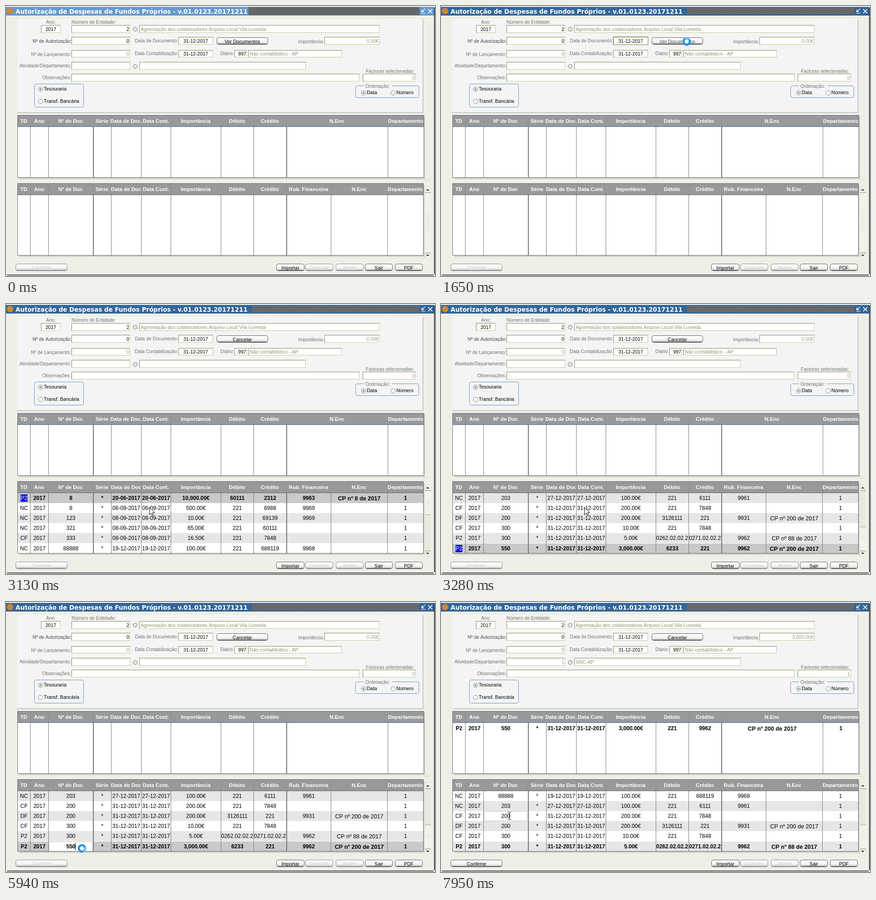
These frames come from a looping animation (943 px wide and 594 px high, 8 s). An HTML page with a canvas:

```html
<!DOCTYPE html>
<html lang="pt">
<head>
<meta charset="utf-8">
<title>Autorização de Despesas</title>
<style>
html, body { margin: 0; width: 100%; height: 100%; overflow: hidden; background: #fff; }
canvas { display: block; }
</style>
</head>
<body>
<canvas id="stage" width="943" height="594"></canvas>
<script>
const ctx = document.getElementById('stage').getContext('2d');
const LOOP = 8000;
const SANS = '"Liberation Sans", Arial, sans-serif';
const ROW_TOP = 416, ROW_H = 22.1, VISIBLE_ROWS = 6;

// TD | doc | dates | amount | debit | credit | budget line | order
const RECORDS = `P2|322|17-10-2013|100.00|228|221|13161|CP nº 322 de 2013
NC|569|02-02-2017,03-05-2017|15.00|0251.07.01.01|024.07.01.01.1|9962
NC|603|02-02-2017,03-05-2017|15.00|0251.07.01.01|024.07.01.01.1|9962
P2|8|20-06-2017|10,000.00|60111|2312|9963|CP nº 8 de 2017
NC|8|06-09-2017|500.00|221|6988|9969
NC|123|08-09-2017|10.00|221|69139|9969
NC|321|08-09-2017|65.00|221|60111
CF|333|08-09-2017|16.50|221|7848
NC|88888|19-12-2017|100.00|221|688119|9968
NC|203|27-12-2017|100.00|221|6111|9961
CF|200|31-12-2017|200.00|221|7848
DF|200|31-12-2017|200.00|3126111|221|9931|CP nº 200 de 2017
CF|300|31-12-2017|10.00|221|7848
P2|300|31-12-2017|5.00|0262.02.02.2.1|0271.02.02.2.1|9962|CP nº 88 de 2017
P2|550|31-12-2017|3,000.00|6233|221|9962|CP nº 200 de 2017`.split('\n').map(line => {
  const [td, doc, dates, amount, debit, credit, budget = '', order = ''] = line.split('|');
  const [docDate, postDate = docDate] = dates.split(',');
  return [td, docDate.slice(6), doc, '*', docDate, postDate, amount + '€', debit, credit, budget, order, '1'];
});
const CHOSEN = ['P2', '2017', '550', '*', '31-12-2017', '31-12-2017', '3,000.00€', '221', '9962', 'CP nº 200 de 2017', '1'];

const SHARED_EDGES = [25, 53, 93, 191, 231, 297, 362, 472, 544, 616];
const TOP = { y: 240, bottom: 377, edges: [...SHARED_EDGES, 839, 918],
  heads: 'TD,Ano,Nº de Doc,Série,Data de Doc.,Data Cont.,Importância,Débito,Crédito,N.Enc,Departamento'.split(',') };
const LIST = { y: 390, bottom: 548, edges: [...SHARED_EDGES, 714, 838, 917],
  heads: 'TD,Ano,Nº de Doc,Série,Data de Doc,Data Cont.,Importância,Débito,Crédito,Rub. Financeira,N.Enc,Departamento'.split(',') };

// Pointer travel: start, end, number of steps, destination
const MOVES = [
  [90, 880, 11, 541, 69], [960, 1110, 3, 540, 78],
  [1970, 2440, 7, 333, 393], [2520, 2670, 3, 316, 443], [3050, 3050, 1, 315, 447],
  [4380, 4840, 7, 171, 542], [5160, 5310, 3, 169, 542], [7250, 7950, 10, 150, 470]
];

function rect(x, y, w, h, color) {
  ctx.fillStyle = color;
  ctx.fillRect(x, y, w, h);
}

function text(s, x, yc, { size = 10.6, align = 'left', color = '#000', bold = false, font = SANS } = {}) {
  ctx.font = `${bold ? 'bold ' : ''}${size}px ${font}`;
  ctx.textAlign = align;
  ctx.fillStyle = color;
  ctx.fillText(s, x, Math.round(yc + size * 0.36));
}

function label(s, x, yc, align = 'right', color = '#707070') {
  text(s, x, yc, { size: 10.3, align, color });
}

function frame(x, y, w, h, radius, stroke, fill) {
  ctx.beginPath();
  ctx.roundRect(x + .5, y + .5, w - 1, h - 1, radius);
  if (fill) { ctx.fillStyle = fill; ctx.fill(); }
  ctx.strokeStyle = stroke;
  ctx.lineWidth = 1;
  ctx.stroke();
}

function disc(x, y, r, fill, stroke) {
  ctx.beginPath();
  ctx.arc(x, y, r, 0, Math.PI * 2);
  ctx.fillStyle = fill;
  ctx.fill();
  if (stroke) { ctx.strokeStyle = stroke; ctx.lineWidth = 1; ctx.stroke(); }
}

function shape(points, fill, stroke) {
  ctx.beginPath();
  points.forEach(([x, y]) => ctx.lineTo(x, y));
  ctx.closePath();
  ctx.fillStyle = fill;
  ctx.fill();
  if (stroke) { ctx.strokeStyle = stroke; ctx.lineWidth = 1; ctx.stroke(); }
}

function line(color, width, ...points) {
  ctx.beginPath();
  points.forEach(([x, y]) => ctx.lineTo(x, y));
  ctx.strokeStyle = color;
  ctx.lineWidth = width;
  ctx.stroke();
}

function field(x, y, right, bottom, value = '', align = 'right', color = '#000', pointer) {
  const w = right - x, h = bottom - y;
  rect(x, y, w, h, '#c6c69c');
  rect(x, y, w, 1, '#85855c');
  rect(x, y, 1, h, '#85855c');
  rect(x + 1, y + 1, w - 2, h - 2, '#fff');
  const tx = { left: x + 3, right: right - 2, center: x + w / 2 }[align];
  text(value, tx, (y + bottom) / 2 + .5, { align, color });
  if (pointer && pointer.x >= x && pointer.x < right && pointer.y >= y && pointer.y < bottom)
    frame(x - 1, y - 1, w + 2, h + 2, 0, '#a8a898');
}

function button(s, x, y, w, { enabled = true, color = '#000' } = {}) {
  const shade = ctx.createLinearGradient(0, y, 0, y + 16);
  shade.addColorStop(0, '#fff');
  shade.addColorStop(.6, '#f4f4f2');
  shade.addColorStop(1, '#b4b4b4');
  frame(x, y, w, 16, 4, enabled ? '#5c5c5c' : '#8c8c8c', shade);
  line(enabled ? '#555' : '#8a8a8a', 1, [x + 3, y + 14.5], [x + w - 3, y + 14.5]);
  if (!enabled) text(s, x + w / 2 + 1, y + 10, { align: 'center', color: '#fff' });
  text(s, x + w / 2, y + 9, { align: 'center', color: enabled ? color : '#c2c2c2' });
}

function radio(s, x, y, selected) {
  disc(x, y, 5, '#f8f8f8', '#8a8a8a');
  if (selected) disc(x, y, 2.6, '#a2a2a2');
  text(s, x + 7, y - 1, { size: 10.7 });
}

function titleBar(active) {
  const blue = active ? '#336699' : '#6699cc';
  rect(0, 2, 941, 19, blue);
  if (active) {
    rect(541, 4, 368, 14, '#666');
    for (let row = 0; row < 5; row++)
      for (let x = 542 + row % 2 * 2; x < 907; x += 4) {
        rect(x, 5 + row * 3, 1, 1, '#d0d0d0');
        rect(x + 1, 6 + row * 3, 1, 1, '#111');
      }
  } else rect(533, 2, 376, 18, '#666');
  disc(9, 11, 7, '#c8873c');
  text('Autorização de Despesas de Fundos Próprios - v.01.0123.20171211', 21, 12,
    { size: 13.44, bold: true, color: '#fff', font: '"DejaVu Sans", Verdana, sans-serif' });
  line('#fff', 1.5, [921, 6], [915, 12]);
  line('#fff', 1.5, [914, 8], [914, 13], [919, 13]);
  line('#fff', 1, [913, 16.5], [922, 16.5]);
  line('#fff', 1.7, [928, 7], [937, 16]);
  line('#fff', 1.7, [937, 7], [928, 16]);
}

function windowFrame() {
  rect(0, 0, 943, 594, '#fff');
  rect(0, 1, 941, 590, '#efefe7');
  rect(941, 3, 1.5, 587, '#111');
  rect(2, 591, 938, 1.5, '#111');
  rect(25, 28, 892, 207, '#f4f4f4');
  rect(916, 29, 1, 206, '#a0a0a0');
  rect(25, 234, 892, 1, '#a0a0a0');
}

function form(state, pointer) {
  const muted = '#94906c', gray = '#9a9a8c';
  label('Ano:', 88, 35, 'left');
  label('Número de Entidade:', 144, 35, 'left');
  label('Nº de Autorização:', 144, 77, 'right', '#444');
  label('Nº de Lançamento:', 143, 106);
  label('Atividade/Departamento:', 143, 131);
  label('Observações:', 143, 157);
  label('Data de Documento:', 378, 76);
  label('Data Contabilização:', 378, 104);
  label('Diário:', 501, 104);
  label('Importância:', 699, 78);
  label('Facturas selecionadas:', 897, 143);

  field(77, 42, 120, 59, '2017', 'center');
  field(144, 42, 273, 59, '2');
  field(293, 42, 821, 59, 'Agremiação dos colaboradores Arquivo Local Vila Lumeda', 'left', muted);
  field(144, 68, 273, 85, '0');
  field(379, 68, 455, 85, '31-12-2017', 'center');
  if (state.dateSelected) {
    rect(389, 70, 56, 14, '#0000e0');
    text('31-12-2017', 417, 77, { align: 'center', color: '#fff' });
  }
  if (state.pressed) frame(378, 67, 78, 19, 0, '#a8a898');
  field(700, 68, 821, 85, state.done ? '3,000.00€' : '0.00€', 'right', gray);
  field(144, 97, 273, 113, '0', 'right', gray);
  field(379, 97, 455, 113, '31-12-2017', 'center');
  field(502, 97, 530, 113, '997');
  field(533, 97, 738, 113, 'Não contabilistico - AP', 'left', muted);
  field(144, 123, 273, 140, state.done ? '1' : '', 'right', gray);
  field(293, 123, 659, 140, state.done ? 'SNC-AP' : '', 'left', muted, pointer);
  field(144, 149, 777, 166, '', 'left', muted, pointer);
  field(784, 149, 901, 166, state.done ? '1' : '0', 'right', gray);
  disc(284, 51, 4.5, '#e4e4e4', '#777');
  disc(284, 133, 4.5, '#e4e4e4', '#777');

  frame(62, 171, 109, 52, 4, '#6a8fc4');
  radio('Tesouraria', 76, 183, true);
  radio('Transf. Bancária', 76, 210, false);
  frame(768, 175, 140, 27, 4, '#6a8fc4');
  rect(787, 174, 62, 3, '#f4f4f4');
  label('Ordenação:', 790, 176, 'left');
  radio('Data', 786, 191, true);
  radio('Número', 851, 191, false);

  button(state.loaded ? 'Cancelar' : 'Ver Documentos', 463, 69, 113, { color: state.pressed ? '#555' : '#000' });
  button('Confirme', 21, 567, 114, { enabled: state.done });
  button('Importar', 594, 567, 62);
  button('Consulta', 658, 567, 61, { enabled: false });
  button('Abater', 725, 567, 61, { enabled: false });
  button('Sair', 789, 567, 61);
  button('PDF', 855, 567, 61);
}

function cell(s, left, right, yc, style) {
  const options = { size: s.startsWith('CP') ? 12.6 : 12, align: 'center', ...style };
  ctx.save();
  ctx.beginPath();
  ctx.rect(left + 1, yc - 11, right - left - 1, 22);
  ctx.clip();
  ctx.font = `${options.bold ? 'bold ' : ''}${options.size}px ${SANS}`;
  if (ctx.measureText(s).width > right - left - 2) text(s, left + 1, yc, { ...options, align: 'left' });
  else text(s, (left + right) / 2 + .5, yc, options);
  ctx.restore();
}

function tableRow(table, values, yc, bold) {
  values.forEach((s, i) => cell(s, table.edges[i], table.edges[i + 1], yc, { bold }));
}

function table({ y, bottom, edges, heads }, accent, drawRows) {
  const left = edges[0], right = edges.at(-1), bodyTop = y + 25;
  rect(left + 4, bottom + 1, right - left, 3, '#d2d2cc');
  rect(right + 1, y + 3, 2, bottom - y, '#d2d2cc');
  rect(left, bodyTop, right - left, bottom - bodyTop, '#fff');
  drawRows();
  edges.slice(1, -1).forEach(x => rect(x, bodyTop, x === 191 || x === 616 ? 2 : 1, bottom - bodyTop, '#777'));
  rect(left, y, right - left, 25, '#999');
  edges.slice(1, -1).forEach(x => rect(x, y + 1, 1, 24, '#909090'));
  heads.forEach((s, i) => text(s, (edges[i] + edges[i + 1]) / 2, y + 13,
    { size: 11.5, align: 'center', bold: true, color: '#fff' }));
  frame(left, y, right - left + 1, bottom - y + 1, 0, '#666');
  rect(left, y, right - left + 1, 1, accent);
  rect(left, bodyTop, right - left + 1, 1, accent);
}

function listRows(state, pointer) {
  if (!state.loaded) return;
  for (let i = 0; i < VISIBLE_ROWS; i++) {
    const index = state.offset + i, y = Math.round(ROW_TOP + i * ROW_H), yc = y + 11;
    const current = index === state.current, selected = current && state.listFocus;
    const record = RECORDS[index];
    if (selected) rect(26, y, 891, 22, '#c9c9c9');
    else if (index % 2) rect(26, y, 891, 22, '#e6e6e6');
    if (current && state.editing) rect(94, y, 97, 22, '#fff');
    tableRow(LIST, record, yc, current);
    if (selected && !state.editing) {
      rect(32, yc - 8, 15, 16, '#0000e0');
      cell(record[0], 25, 53, yc, { color: '#fff' });
    }
    if (current && state.editing) rect(152, yc - 8, 1, 16, '#000');
    if (overDoc(pointer) && pointer.y >= y && pointer.y < y + 22) frame(94, y, 96, 22, 0, '#c4c4bc');
  }
}

function scrollBar(state) {
  const thumbTop = state.atEnd ? 490 : 411, thumbEnd = state.loaded && !state.atEnd ? 463 : 541;
  rect(921, 411, 13, 130, '#e9e9df');
  rect(921, thumbTop, 13, thumbEnd - thumbTop, '#f2f2ea');
  if (state.loaded) rect(921, state.atEnd ? thumbTop : thumbEnd, 13, 1, '#a9a97c');
  const middle = (thumbTop + thumbEnd) / 2, span = state.loaded ? 4 : 16;
  for (let d = -span; d <= span; d += 4) {
    rect(929, middle + d - 2, 1, 1, '#a0a080');
    rect(925, middle + d, 1, 1, '#a0a080');
  }
  for (const [y, dir] of [[404, -1], [549, 1]]) {
    frame(921, y - 7, 13, 14, 4, '#d6d6c2', '#f7f7f0');
    rect(921, y - dir * 6, 13, 1, '#8a8a6a');
    shape([[923, y - dir * 2], [931, y - dir * 2], [927, y + dir * 2]], '#444');
  }
  line('#d0d0c0', 1, [920, 383.5], [929, 383.5], [933.5, 379]);
}

const overDoc = p => p.x > 93 && p.x < 191 && p.y > ROW_TOP && p.y < 549;

function pointerAt(t) {
  let x = 850, y = 600;
  for (const [start, end, steps, toX, toY] of MOVES) {
    if (t < start) break;
    const interval = steps > 1 ? (end - start) / (steps - 1) : 1;
    const u = Math.min(1, (Math.floor((t - start) / interval + .01) + 1) / steps);
    const eased = u * u * (3 - 2 * u);
    x += (toX - x) * eased;
    y += (toY - y) * eased;
  }
  return { x: Math.round(x), y: Math.round(y) };
}

function drawPointer({ x, y }, t) {
  if (t < 90) return;
  const busy = (t >= 1570 && t < 1720) || (t >= 5860 && t < 6090);
  const clicking = t >= 5690 && t < 5860;
  if (busy) {
    if (t > 5000) x -= 2;
    const turn = t / 1000 * Math.PI * 2;
    disc(x, y, 9, '#fff');
    ctx.lineWidth = 4.5;
    ctx.strokeStyle = '#1e90ec';
    ctx.beginPath();
    ctx.arc(x, y, 7, 0, Math.PI * 2);
    ctx.stroke();
    ctx.strokeStyle = '#62bdf8';
    ctx.beginPath();
    ctx.arc(x, y, 7, turn, turn + 1.6);
    ctx.stroke();
  } else if (overDoc({ x, y }) && !clicking) {
    rect(x, y - 7, 1, 15, '#000');
    for (const edge of [y - 8, y + 8]) {
      rect(x - 3, edge, 3, 1, '#000');
      rect(x + 1, edge, 3, 1, '#000');
    }
  } else {
    const outline = [[0, 0], [0, 16], [4, 12.5], [6.5, 18], [9, 17], [6.5, 11.5], [11.5, 11.5]];
    shape(outline.map(([dx, dy]) => [x + dx + .5, y + dy + .5]), '#fff', '#000');
  }
}

function stateAt(t) {
  const done = t >= 6010;
  let offset = 0, current = 0;
  if (t >= 3050) offset = current = 3;
  if (t >= 3200) offset = current = 6;
  if (t >= 3280) { offset = 9; current = 14; }
  if (done) { offset = 8; current = 13; }
  return {
    done, offset, current,
    active: t >= 1490,
    pressed: t >= 1490 && t < 1720,
    loaded: t >= 1720,
    dateSelected: t >= 1720 && t < 3050,
    listFocus: t >= 3050 && !done,
    atEnd: t >= 3280,
    editing: t >= 5620 && !done
  };
}

function draw(t) {
  const state = stateAt(t), pointer = pointerAt(t);
  windowFrame();
  titleBar(state.active);
  form(state, pointer);
  table(TOP, '#4a6f9c', () => { if (state.done) tableRow(TOP, CHOSEN, 278, true); });
  table(LIST, '#666', () => listRows(state, pointer));
  scrollBar(state);
  drawPointer(pointer, t);
}

const began = performance.now();
function tick() {
  draw((performance.now() - began) % LOOP);
  requestAnimationFrame(tick);
}
tick();
</script>
</body>
</html>
```
